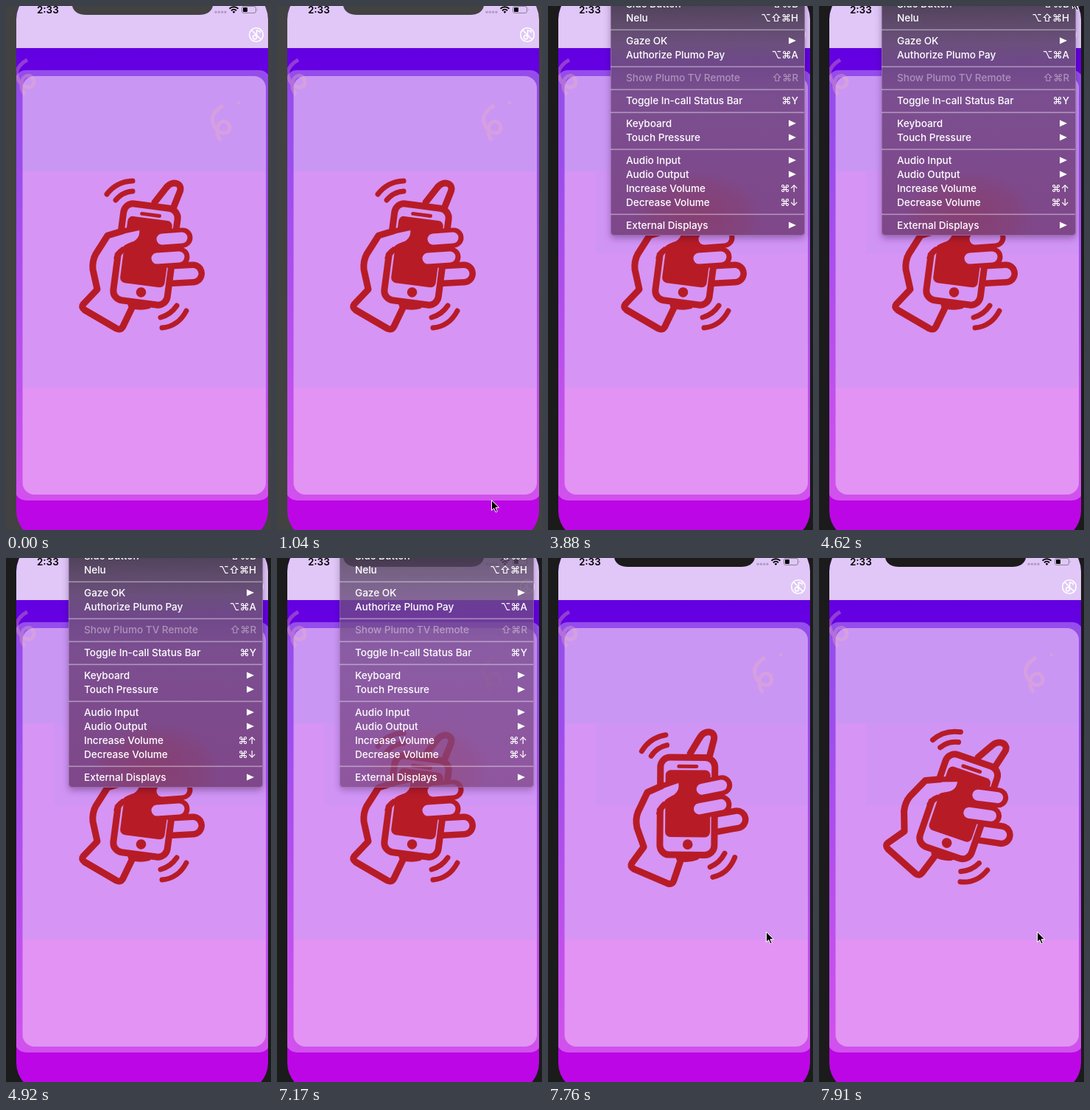
An HTML page for the animation above (8 s loop, 360 by 710 pixels).

```html
<!DOCTYPE html>
<html lang="en">
<head>
<meta charset="utf-8">
<title>Shake gesture in a phone simulator</title>
<style>
  html, body { margin: 0; width: 100%; height: 100%; overflow: hidden; }
  svg { display: block; width: 360px; height: 710px; font-family: Inter, "DejaVu Sans", sans-serif; }
  .line { fill: none; stroke: #b71c26; stroke-width: 9; stroke-linecap: round; stroke-linejoin: round; }
  .skin { fill: none; stroke: #d694f5; stroke-width: 15; stroke-linecap: round; }
  .red { fill: #b71c26; }
  .ribbon { fill: none; stroke: #eeb0b8; stroke-width: 5; opacity: .34; }
  #menuBox rect:first-child { filter: drop-shadow(0 4px 5px rgba(30, 0, 50, .32)); }
  #menuItems { font-size: 13.55px; font-weight: 500; fill: #fff; }
  .shortcut { text-anchor: end; font-size: 13.3px; }
</style>
</head>
<body>
<svg viewBox="0 0 360 710">
  <defs>
    <linearGradient id="wall" x2="0" y2="1">
      <stop offset=".1" stop-color="#6200e2"/><stop offset=".35" stop-color="#7300e3"/>
      <stop offset=".9" stop-color="#bb06e5"/><stop offset="1" stop-color="#bd06e6"/>
    </linearGradient>
    <linearGradient id="panel" gradientUnits="userSpaceOnUse" x1="0" y1="95" x2="0" y2="662">
      <stop offset=".2275" stop-color="#ca96f4"/><stop offset=".2275" stop-color="#d694f5"/>
      <stop offset=".7443" stop-color="#d694f5"/><stop offset=".7443" stop-color="#e293f3"/>
    </linearGradient>
    <linearGradient id="glass" gradientUnits="userSpaceOnUse" x1="0" y1="0" x2="0" y2="311">
      <stop stop-color="#52435d"/><stop offset=".08" stop-color="#5f4b6c"/>
      <stop offset=".17" stop-color="#6c4f7e"/><stop offset=".25" stop-color="#6f4889"/>
      <stop offset=".4" stop-color="#7b4e90"/><stop offset="1" stop-color="#7f4789"/>
    </linearGradient>
    <radialGradient id="warm">
      <stop stop-color="#8c3a62" stop-opacity=".6"/><stop offset=".7" stop-color="#8c3a62" stop-opacity=".3"/>
      <stop offset="1" stop-color="#8c3a62" stop-opacity="0"/>
    </radialGradient>
    <clipPath id="screen"><rect x="14" y="-22" width="342" height="746" rx="40"/></clipPath>
    <clipPath id="menuClip"><rect x="85" y="-20" width="264" height="331" rx="5"/></clipPath>
    <path id="curl" d="M295 135C282 142 278 152 282 160C286 173 303 177 304 165C303 153 288 153 287 168Q286 176 292 182"/>
  </defs>

  <rect id="bezel" width="360" height="710"/>
  <g clip-path="url(#screen)">
    <rect x="14" y="-22" width="342" height="746" fill="url(#wall)"/>
    <rect x="14" y="-22" width="342" height="79" fill="#e0c7f7"/>
    <rect x="12" y="87" width="347" height="583" rx="15" fill="#fff" opacity=".3"/>
    <rect x="22.5" y="95" width="330.5" height="567" rx="16" fill="url(#panel)"/>
    <rect id="tint" x="65" y="224" width="288" height="111" fill="#d094f5"/>
    <use href="#curl" class="ribbon"/>
    <use href="#curl" class="ribbon" x="-266" y="-62"/>
    <circle cx="316" cy="131" r="2" fill="#eeb0b8" opacity=".4"/>

    <path id="notch" d="M90 0Q93 12 109 12H262Q278 12 281 0Z"/>
    <text x="42" y="10" font-size="13.4" font-weight="600">2:33</text>
    <g fill="#b19cc4">
      <circle cx="285" cy="8.3" r="1.7"/><circle cx="289.3" cy="8.3" r="1.7"/>
      <circle cx="293.6" cy="8.3" r="1.7"/><circle cx="297.9" cy="8.3" r="1.7"/>
    </g>
    <path d="M303.5 3.6a8.7 8.7 0 0 1 12 0M306 6.2a5 5 0 0 1 7 0" fill="none" stroke="#000" stroke-width="2"/>
    <path d="M307.6 7.8a3 3 0 0 1 3.8 0L309.5 10Z"/>
    <rect x="320.5" y=".5" width="19" height="9" rx="2.5" fill="none" stroke="#8d7d9b"/>
    <rect x="322" y="2" width="6" height="6" rx="1"/>
    <path d="M341 3.5q1.5 1.5 0 3z" fill="#8d7d9b"/>
    <g fill="none" stroke="#fff" stroke-width="1.6">
      <circle cx="340" cy="39" r="9.3"/>
      <path d="M333.5 32.5L346.5 45.5M340.5 42V33L345 34.2V36.5"/>
      <circle cx="338" cy="42.3" r="2.6"/>
    </g>

    <g id="hand">
      <path class="line" d="M202 266L217 247C226 235 241 240 236 252L228 272"/>
      <path class="line" style="stroke-width:32" d="M226 364L254 362.5"/>
      <path class="skin" d="M226 364L254 362.5"/>
      <path class="line" d="M170 405Q182 409 193 406"/>
      <g transform="translate(189.5 336.5) rotate(7.5)">
        <rect class="line" x="-37" y="-66" width="74" height="132" rx="13" style="fill:#d694f5"/>
        <rect class="red" x="-30" y="-49" width="61" height="91" rx="7"/>
        <circle class="red" cx=".8" cy="51.8" r="6.8"/>
        <path class="line" style="stroke-width:5" d="M-12 -54H12"/>
      </g>
      <path class="line" style="stroke-width:27" d="M212 316L240 314M205 342L236 340"/>
      <path class="skin" d="M212 316L239 314M205 342L235 340"/>
      <path fill="#d694f5" d="M138 315L181 302Q183 315 171 320Q157 324 148 335L126 342Z"/>
      <path class="line" style="stroke-width:7" d="M172 323Q158 328 150 341"/>
      <path class="line" d="M158 305L138 311L122 336Q117 345 118 357L124 384L105 404Q102 408 107 412L150 437Q156 440 159 434L172 407"/>
      <path class="red" d="M157 301L183 299L181 304L158 309Z"/>
      <path class="line" style="stroke-width:7" d="M137 255Q150 238 172 237M149 263Q158 252 172 251M210 422Q224 418 232 406M212 436Q234 434 245 413"/>
    </g>
  </g>

  <g id="menu">
    <g id="menuBox">
      <rect x="85" y="-20" width="264" height="331" rx="5" fill="url(#glass)"/>
      <ellipse cx="203" cy="285" rx="88" ry="62" fill="url(#warm)" clip-path="url(#menuClip)"/>
      <rect x="85.5" y="-20" width="263" height="330.5" rx="5" fill="none" stroke="#b794c6" stroke-opacity=".45"/>
    </g>
    <g id="menuItems"></g>
  </g>
  <path id="cursor" d="M1.5 1.5v14l3.2-3 2.4 5.3 2.2-1-2.3-5.1h4.6z" stroke="#fff"/>
</svg>
<script>
const LOOP = 8000;
const $ = id => document.getElementById(id);

// Row centre, label, shortcut; no shortcut means a submenu arrow.
const rows = [
  [-3, "Side Button", "⇧⌘B"], [16, "Nelu", "⌥⇧⌘H"],
  [47, "Gaze OK"], [66, "Authorize Plumo Pay", "⌥⌘A"],
  [97, "Show Plumo TV Remote", "⇧⌘R"], [128, "Toggle In-call Status Bar", "⌘Y"],
  [159, "Keyboard"], [178, "Touch Pressure"],
  [209, "Audio Input"], [228, "Audio Output"],
  [247, "Increase Volume", "⌘↑"], [266, "Decrease Volume", "⌘↓"],
  [297, "External Displays"]
];
const separators = [32, 82, 113, 144, 194, 282];

$("menuItems").innerHTML = rows.map(([y, label, keys]) => {
  const right = keys
    ? `<text class="shortcut" x="340" y="${y + 5}">${keys}</text>`
    : `<path d="M327 ${y - 4.5}L337 ${y}L327 ${y + 4.5}Z"/>`;
  const opacity = label.startsWith("Show") ? .4 : 1;
  return `<g opacity="${opacity}"><text x="106" y="${y + 5}">${label}</text>${right}</g>`;
}).join("") + separators.map(y =>
  `<rect x="85" y="${y - .5}" width="263" height="1.6" opacity=".4"/>`).join("");

// Each track lists [start time, value]; values hold until the next entry.
const bezelTrack = [[0, "#424242"], [1490, "#1b1b1b"]];
const menuTrack = [[0, 0], [3880, 1], [7170, .8], [7320, 0]];
const tintTrack = [[0, 0], [3880, 1]];
const angleTrack = [[0, 0], [7610, -.7], [7760, -7], [7910, 11.5]];
const cursorTrack = [
  [0, null], [900, [292, 675]], [1040, [290, 668]], [1780, null],
  [4620, [343, -12]], [4920, null], [7760, [295, 505]]
];
const valueAt = (track, t) => track.findLast(([start]) => start <= t)[1];

function draw() {
  const t = performance.now() % LOOP;
  const bezel = valueAt(bezelTrack, t);
  $("bezel").setAttribute("fill", bezel);
  $("notch").setAttribute("fill", bezel);

  const menu = valueAt(menuTrack, t);
  $("menu").style.display = menu ? "" : "none";
  $("menuBox").setAttribute("opacity", menu);

  $("tint").setAttribute("opacity", valueAt(tintTrack, t));
  $("hand").setAttribute("transform", `rotate(${valueAt(angleTrack, t)} 188 337.5)`);

  const cursor = valueAt(cursorTrack, t);
  $("cursor").style.display = cursor ? "" : "none";
  if (cursor) $("cursor").setAttribute("transform", `translate(${cursor})`);
  requestAnimationFrame(draw);
}
draw();
</script>
</body>
</html>
```
